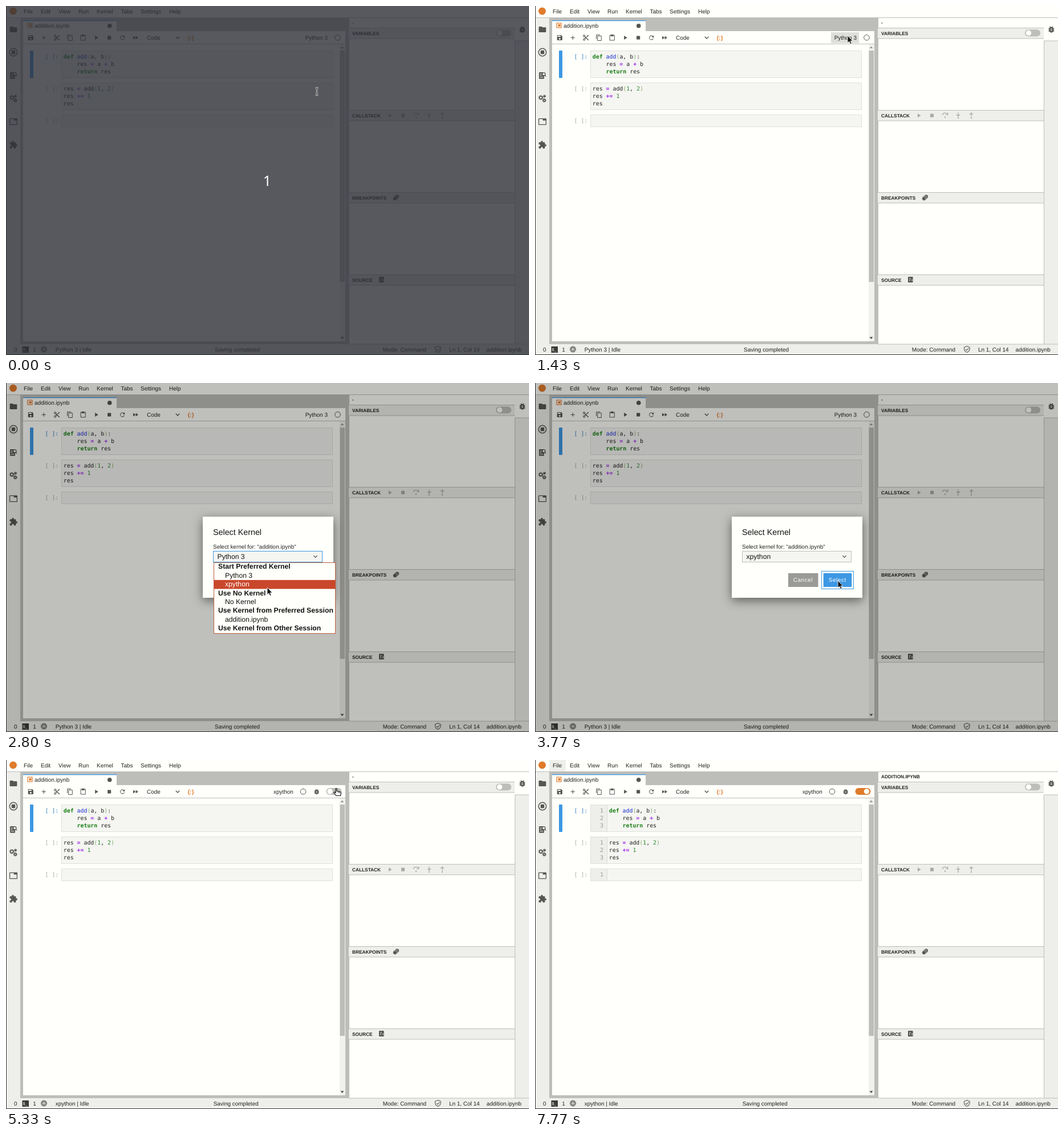
An HTML page for the animation above (8.03 s loop, 917x611 px).

```html
<!DOCTYPE html>
<html lang="en">
<head>
<meta charset="utf-8">
<title>Notebook debugger</title>
<style>
html, body { margin: 0; width: 100%; height: 100%; overflow: hidden; background: #fffffb; }
svg { display: block; width: 100%; height: 100%; }
text { font: 9.95px "Liberation Sans", Arial, sans-serif; fill: #222; white-space: pre; text-rendering: geometricPrecision; }
.mono { font: 9.9px "DejaVu Sans Mono", monospace; }
.head { font-weight: bold; font-size: 8.3px; }
.big { font-size: 12.2px; fill: #111; }
.bold { font-weight: bold; }
.btn { fill: #fffffb; letter-spacing: .6px; }
.k { fill: #1c8018; font-weight: bold; }
.f { fill: #1a2fd0; }
.o { fill: #a02be8; font-weight: bold; }
.n { fill: #2a8a2a; }
.p { fill: #7fb069; }
</style>
</head>
<body>
<svg id="stage" viewBox="0 0 917 611" xmlns="http://www.w3.org/2000/svg"></svg>
<script>
const PAGE = '#fffffb', PANEL = '#eeeeeb', GREY = '#bdbdb9', ICON = '#555552', BLUE = '#3d98e4', ORANGE = '#e07b2c';

const rect = (x, y, w, h, fill, extra = '') =>
  `<rect x="${x}" y="${y}" width="${w}" height="${h}" fill="${fill}" ${extra}/>`;
const text = (x, y, s, cls = '', extra = '') => `<text x="${x}" y="${y}" class="${cls}" ${extra}>${s}</text>`;
const disc = (x, y, r, fill, extra = '') => `<circle cx="${x}" cy="${y}" r="${r}" fill="${fill}" ${extra}/>`;
const line = (d, color, w = 1) => `<path d="${d}" fill="none" stroke="${color}" stroke-width="${w}"/>`;
const group = (id, body, extra = '') => `<g id="${id}" ${extra}>${body}</g>`;
const outline = (color, w = 1) => `stroke="${color}" stroke-width="${w}"`;

// Icons are drawn on a 24 unit grid, centred on (x, y).
const shapes = {
  folder: 'M10 4H4c-1.1 0-2 .9-2 2v12c0 1.1.9 2 2 2h16c1.1 0 2-.9 2-2V8c0-1.1-.9-2-2-2h-8z',
  puzzle: 'M20.5 11H19V7c0-1.1-.9-2-2-2h-4V3.5a2.5 2.5 0 0 0-5 0V5H4c-1.1 0-2 .9-2 2v3.8h1.5a2.7 2.7 0 0 1 0 5.4H2V20c0 1.1.9 2 2 2h3.8v-1.5a2.7 2.7 0 0 1 5.4 0V22H17c1.1 0 2-.9 2-2v-4h1.5a2.5 2.5 0 0 0 0-5z',
  tabs: 'M21 3H3c-1.1 0-2 .9-2 2v14c0 1.1.9 2 2 2h18c1.1 0 2-.9 2-2V5c0-1.1-.9-2-2-2zm0 16H3V5h10v4h8v10z',
  save: 'M17 3H5a2 2 0 0 0-2 2v14a2 2 0 0 0 2 2h14a2 2 0 0 0 2-2V7zm-5 16a3 3 0 1 1 0-6 3 3 0 0 1 0 6zm3-10H5V5h10z',
  add: 'M19 13h-6v6h-2v-6H5v-2h6V5h2v6h6z',
  cut: 'M9.6 7.6A4 4 0 1 0 6 10c.6 0 1.1-.1 1.6-.4L10 12l-2.4 2.4A4 4 0 1 0 10 18c0-.6-.1-1.1-.4-1.6L12 14l7 7h3v-1zM6 8a2 2 0 1 1 0-4 2 2 0 0 1 0 4zm0 12a2 2 0 1 1 0-4 2 2 0 0 1 0 4zM19 3l-6 6 2 2 7-7V3z',
  copy: 'M16 1H4a2 2 0 0 0-2 2v14h2V3h12zm3 4H8a2 2 0 0 0-2 2v14a2 2 0 0 0 2 2h11a2 2 0 0 0 2-2V7a2 2 0 0 0-2-2zm0 16H8V7h11z',
  paste: 'M19 2h-4.2a3 3 0 0 0-5.6 0H5a2 2 0 0 0-2 2v16a2 2 0 0 0 2 2h14a2 2 0 0 0 2-2V4a2 2 0 0 0-2-2zm0 18H5V4h2v3h10V4h2z',
  play: 'M8 5v14l11-7z',
  stop: 'M6 6h12v12H6z',
  refresh: 'M17.65 6.35A8 8 0 1 0 19.73 14h-2.08A6 6 0 1 1 12 6c1.66 0 3.14.69 4.22 1.78L13 11h7V4z',
  forward: 'M4 18l8.5-6L4 6zm9-12v12l8.5-6z',
  bug: 'M20 8h-2.8a6 6 0 0 0-1.8-2L17 4.4 15.6 3l-2.2 2.2a6 6 0 0 0-2.8 0L8.4 3 7 4.4 8.6 6a6 6 0 0 0-1.8 2H4v2h2.1L6 12H4v2h2l.1 2H4v2h2.8a6 6 0 0 0 10.4 0H20v-2h-2.1l.1-2h2v-2h-2l-.1-2H20zm-6 8h-4v-2h4zm0-4h-4v-2h4z'
};
const icon = (name, x, y, scale = .51, fill = ICON) =>
  `<path d="${shapes[name]}" fill="${fill}" fill-rule="evenodd" transform="translate(${x} ${y}) scale(${scale}) translate(-12 -12)"/>`;
const chevron = (x, y) => line(`M${x - 3.3} ${y - 1.6}l3.3 3.3 3.3-3.3`, ICON, 1.3);
const gear = (x, y, r) =>
  disc(x, y, r, 'none', outline(ICON, 1.6)) +
  disc(x, y, r + 1, 'none', outline(ICON, 1.4) + ` stroke-dasharray="${(r + 1) * Math.PI / 8}"`);
const toggle = (x, y, on) =>
  rect(x, y, 27, 12, on ? ORANGE : GREY, 'rx="6"') + disc(x + (on ? 20 : 6.5), y + 6, 4.7, PAGE);

const highlight = s => s.replace(/(\b(?:def|return)\b)|((?<=def )\w+)|(\+=|[=+])|(\d)|([()])/g,
  (m, ...g) => `<tspan class="${'kfonp'[g.slice(0, 5).findIndex(Boolean)]}">${m}</tspan>`);

const cells = [
  { y: 78, h: 47, code: ['def add(a, b):', '    res = a + b', '    return res'] },
  { y: 134, h: 47, code: ['res = add(1, 2)', 'res += 1', 'res'] },
  { y: 190, h: 21, code: [''] }
];

function menuAndSidebars() {
  const menu = [['File', 31], ['Edit', 61], ['View', 92], ['Run', 127], ['Kernel', 159], ['Tabs', 201.5], ['Settings', 236], ['Help', 286]];
  return rect(0, 0, 917, 611, PAGE) + group('fileHover', rect(25, 0, 29, 20, PANEL)) +
    disc(12.5, 9, 6.5, ORANGE) +
    menu.map(([s, x]) => text(x, 13.2, s)).join('') +
    rect(1, 20, 916, 1, GREY) + rect(1, 21, 24, 571, PANEL) + rect(25, 21, 576, 571, GREY) +
    icon('folder', 13, 41, .64) +
    disc(13, 81, 6.7, 'none', outline(ICON, 1.5)) + rect(9.8, 77.8, 6.4, 6.4, ICON, 'rx="1"') +
    rect(7, 116, 9, 11.5, ICON, 'rx="1"') + line('M8.5 119h4M8.5 121.5h3M8.5 124.5h6', PANEL) +
    disc(15.3, 119.3, 2.7, PANEL, outline(ICON, 1.3)) + line('M17 121l2 2.4', ICON, 1.4) +
    gear(10.2, 160.3, 2.5) + gear(16.3, 165.2, 1.8) + gear(16.6, 158, 1) +
    icon('tabs', 13, 202.5, .64) + icon('puzzle', 13, 243, .64);
}

function notebook() {
  const tools = ['save', 'add', 'cut', 'copy', 'paste', 'play', 'stop', 'refresh', 'forward'];
  let s = rect(30, 25, 164, 20, PAGE) + rect(30, 25, 164, 1.3, BLUE) +
    rect(38, 30, 8, 8, 'none', outline(ORANGE, 1.2)) + rect(40.5, 32, 4, 4, ORANGE) +
    text(50, 37.8, 'addition.ipynb') + disc(181.7, 34.8, 3.8, ICON) +
    rect(30, 44, 565, 543, PAGE) + rect(30, 66, 565, 1, GREY) +
    tools.map((n, i) => icon(n, 43.3 + i * 22.97, 55.5)).join('') +
    text(247, 58.6, 'Code') + chevron(301, 55.3) +
    text(324, 58.6, '{:}', 'bold', `text-anchor="middle" style="fill:${ORANGE}"`) +
    group('pyKernel', group('kernelHover', rect(519, 46, 49, 19, '#dededb')) + text(524.7, 58.7, 'Python 3') +
      disc(581.5, 55.3, 4.8, 'none', outline(ICON, 1))) +
    group('xpKernel', text(469, 58.7, 'xpython') + disc(521, 55.3, 4.8, 'none', outline(ICON, 1) + ' id="busy"') +
      group('debugBug', icon('bug', 544.7, 55.5)) +
      group('debugOff', toggle(561.5, 49, false)) + group('debugOn', toggle(561.5, 49, true))) +
    rect(585, 67, 10, 520, '#f1f1ee') + rect(585.5, 78, 8.5, 405, GREY) +
    '<path d="M586.5 74h6l-3-3.5z" fill="#999"/><path d="M586.5 579.5h6l-3 3.5z" fill="#444"/>' +
    rect(42, 78, 6, 48, BLUE, 'rx="1"');
  let code = '', gutter = '';
  cells.forEach((c, i) => {
    s += rect(97.5, c.y + .5, 475, c.h, '#f5f5f2', outline('#dfdfdc')) +
      text(68.5, c.y + 14.3, '[ ]:', 'mono', `style="fill:${i ? '#aaaaa5' : '#307fc1'}"`);
    gutter += rect(98, c.y + 1, 28, c.h - 1, PANEL) + rect(126, c.y + 1, 1, c.h - 1, '#dcdcd9');
    c.code.forEach((row, n) => {
      const y = c.y + 14.3 + n * 13;
      code += text(100.8, y, highlight(row), 'mono');
      gutter += text(120, y, n + 1, 'mono', 'text-anchor="end" style="fill:#999"');
    });
  });
  return s + group('gutter', gutter) + group('code', code);
}

function debugPanel() {
  const dim = '#aaaaa6';
  const heads = [['VARIABLES', 38], ['CALLSTACK', 182], ['BREAKPOINTS', 326], ['SOURCE', 470]];
  return rect(601, 21, 291, 571, PAGE) + rect(601, 21, 1, 571, GREY) +
    text(607, 32.3, '-', 'head', 'id="panelTitle"') +
    heads.map(([s, y]) => rect(601, y, 291, 19, PANEL) + rect(601, y, 291, 1, GREY) + rect(601, y + 18.5, 291, 1, GREY) +
      text(607, y + 12.6, s, 'head')).join('') +
    toggle(859, 41.2, false) +
    icon('play', 673, 191.7, .51, dim) + icon('stop', 696, 191.7, .51, dim) +
    line('M714.5 191a4.5 4 0 0 1 8.5-1.5M723.7 186.5v4h-4M742 186.5v6M739 190l3 3 3-3M765 194v-6M762 190l3-3 3 3', dim, 1.2) +
    disc(719, 194.7, 1.2, dim) + disc(742, 195.7, 1.2, dim) + disc(765, 196, 1.2, dim) +
    disc(685.7, 333.8, 3.4, ICON) + disc(683.8, 335.6, 3.6, ICON, outline(PANEL, .6)) + disc(682, 337.2, 3.4, ICON, outline(PANEL, .6)) +
    rect(654, 474, 8.6, 10, ICON, 'rx="1"') + line('M656 477h3M658 481.5l-2-1.5 2-1.5M660 478.5l2 1.5-2 1.5', PANEL, .9) +
    rect(892, 21, 25, 571, PANEL) + rect(892, 21, 1, 571, GREY) + rect(892, 21, 25, 40, PAGE) + rect(892, 60.5, 25, 1, GREY) +
    icon('bug', 905.3, 41, .62);
}

function statusBar() {
  const y = 604.6;
  return rect(1, 592, 916, 19, PANEL) + rect(601, 591.5, 316, 1, GREY) +
    text(14, y, '0') + rect(28.5, 596, 11.5, 11, '#3a3a38') + text(29.8, 603.8, '$_', '', 'style="font-size:7px;fill:#fff"') +
    text(47.3, y, '1') +
    disc(66.5, 601, 4.2, 'none', outline(ICON, 1.2)) + disc(66.5, 601, 5.2, 'none', outline(ICON, 1) + ' stroke-dasharray="1 1.04"') +
    rect(64.5, 599, 4, 4, 'none', outline(ICON, 1)) +
    text(86.7, y, '', '', 'id="status"') + text(366, y, 'Saving completed', '', 'id="saved"') +
    text(660.8, y, 'Mode: Command') +
    line('M757.3 595.5l4.8 2v3.2q-.5 4-4.8 5.6q-4.3-1.600-4.800-5.600v-3.200zM754.800 600.800l2 2 3.500-3.700', ICON, 1.1) +
    text(777, y, 'Ln 1, Col 14') + text(842.4, y, 'addition.ipynb');
}

function dialog() {
  const items = ['*Start Preferred Kernel', 'Python 3', 'xpython', '*Use No Kernel', 'No Kernel',
    '*Use Kernel from Preferred Session', 'addition.ipynb', '*Use Kernel from Other Session'];
  const rows = items.map((s, i) => s[0] === '*'
    ? text(372, 325.4 + i * 15.4, s.slice(1), 'big bold')
    : text(384, 325.4 + i * 15.4, s, 'big', `id="item${i}"`)).join('');
  return group('dialog', rect(0, 0, 917, 611, '#000', 'opacity=".25"') +
    rect(345, 234, 229, 142, PAGE, 'style="filter:drop-shadow(0 5px 9px rgba(0,0,0,.5))"') +
    text(363, 266, 'Select Kernel', 'big', 'style="font-size:14.3px"') +
    text(363, 289.5, 'Select kernel for: "addition.ipynb"') +
    rect(363.5, 294.5, 191, 19, '#f5f5f2', outline(GREY) + ' id="select"') +
    text(370.5, 308, 'Python 3', 'big', 'id="choice"') + chevron(542.5, 303.7) +
    rect(444, 333, 52.5, 24, '#9a9a96') + text(452.7, 348.3, 'Cancel', 'btn') +
    rect(505.7, 333, 49.6, 24, BLUE) + text(514.7, 348.3, 'Select', 'btn') +
    rect(502.5, 329.5, 56, 31, 'none', outline(BLUE) + ' id="ring"') +
    group('list', rect(364.5, 314.5, 213, 124, PAGE, outline('#b9603f')) +
      rect(364.5, 345, 213, 15.6, '#c9472b', 'id="marked"') + rows));
}

function overlays() {
  return group('tip', rect(583, 64, 156, 23, '#2d2d2b', 'rx="3"') +
      text(661, 79.5, 'Enable / Disable Debugger', 'big', 'text-anchor="middle" style="fill:#fff"')) +
    group('countdown', rect(1, 0, 916, 610, 'rgb(45,48,56)', 'opacity=".8"') +
      text(458, 315, '1', '', 'text-anchor="middle" style="font:25px \'Noto Sans\',sans-serif;fill:#fff"')) +
    rect(0, 0, 1, 611, '#333') + rect(0, 610, 917, 1, '#333') +
    group('arrow', `<path d="M0 0v12.600l2.900-2.600 2 4.500 2.200-1-2-4.200h3.800z" fill="#111" stroke="#fff" stroke-width=".8"/>`) +
    group('beam', line('M-2.500-5.500q2.500 0 2.500 1.500q0-1.500 2.500-1.500M0-4.500v10M-2.500 6.500q2.500 0 2.500-1.500q0 1.500 2.500 1.500', '#fff', 2.4) +
      line('M-2.500-5.500q2.500 0 2.500 1.500q0-1.500 2.500-1.500M0-4.500v10M-2.500 6.500q2.500 0 2.500-1.500q0 1.500 2.500 1.500', '#111', 1)) +
    group('hand', `<path d="M0 0q1.300-1 2 .5v4l5.500 1q2 .5 2 2.500l-1 4.500H1L-3 7.500q-.5-1.500 1-1.500l2 1.500z" fill="#fff" stroke="#111" stroke-width="1.200"/>` +
      line('M4.300 5.200v2.500M6.700 5.700v2.300', '#111', .8));
}

const stage = document.getElementById('stage');
stage.innerHTML = menuAndSidebars() + notebook() + debugPanel() + statusBar() + dialog() + overlays();
const el = {};
stage.querySelectorAll('[id]').forEach(e => el[e.id] = e);

const show = (id, on) => el[id].setAttribute('display', on ? 'inline' : 'none');
const put = (id, s) => { if (el[id].textContent !== s) el[id].textContent = s; };
const within = (v, a, b) => v >= a && v < b;

// Pointer stops: time, x, y
const path = [
  [800, 545, 149], [1330, 548, 52], [1730, 548, 52], [2330, 375, 306], [2470, 375, 306],
  [2600, 415, 314], [2790, 415, 314], [2799, 458, 358], [3020, 458, 358], [3029, 568, 352],
  [3230, 568, 352], [3700, 531, 346], [4400, 531, 346], [4830, 551, 164], [4930, 551, 164],
  [5330, 578, 50], [6830, 578, 50], [7270, 535, 53], [7370, 535, 53], [7735, 42, -20]
];
function pointerAt(t) {
  const i = path.findIndex(p => p[0] > t);
  if (i < 0) return path[path.length - 1].slice(1);
  if (i === 0) return path[0].slice(1);
  const [t0, x0, y0] = path[i - 1], [t1, x1, y1] = path[i];
  const u = (t - t0) / (t1 - t0), k = u * u * (3 - 2 * u);
  return [x0 + (x1 - x0) * k, y0 + (y1 - y0) * k];
}

function drawPointer(t, modal) {
  const tick = 100 / 3;
  const [x, y] = pointerAt(Math.floor((t + 4) / tick) * tick);
  const overCode = !modal && within(x, 97, 572) && cells.some(c => within(y, c.y, c.y + c.h));
  const overToggle = t > 4900 && within(x, 561, 590) && within(y, 47, 62);
  const kind = overCode ? 'beam' : overToggle ? 'hand' : 'arrow';
  for (const id of ['beam', 'hand', 'arrow']) show(id, id === kind);
  el[kind].setAttribute('transform', `translate(${x} ${y})`);
  return [x, y];
}

function draw(t) {
  const modal = within(t, 1500, 3830), open = within(t, 2470, 3230), xp = t >= 4130, lined = t >= 6900;
  const busy = within(t, 4130, 4600) || within(t, 6300, 6430) || within(t, 6900, 7000);
  const [x, y] = drawPointer(t, modal);

  show('countdown', t < 30);
  show('dialog', modal);
  show('list', open);
  show('ring', t < 2470 || t >= 3700);
  el.select.setAttribute('stroke', within(t, 2470, 3700) ? BLUE : GREY);
  put('choice', t < 3230 ? 'Python 3' : 'xpython');
  const row = t < 2800 ? 1 : 2;
  el.marked.setAttribute('y', 313.9 + row * 15.5);
  el.item1.style.fill = row === 1 ? '#fff' : '';
  el.item2.style.fill = row === 2 ? '#fff' : '';

  show('pyKernel', !xp);
  show('xpKernel', xp);
  show('kernelHover', t < 1570 && within(x, 519, 568) && within(y, 46, 65));
  show('debugBug', t >= 4330);
  show('debugOff', within(t, 4330, 6300));
  show('debugOn', t >= 6300);
  el.busy.setAttribute('fill', busy ? ICON : 'none');
  put('status', (xp ? 'xpython' : 'Python 3') + ' | ' + (busy ? (t < 4600 ? 'Starting' : 'Busy') : 'Idle'));
  el.saved.setAttribute('x', xp ? 363.7 : 366);

  show('tip', within(t, 5770, 6300));
  show('gutter', lined);
  el.code.setAttribute('transform', `translate(${lined ? 29 : 0} 0)`);
  put('panelTitle', lined ? 'ADDITION.IPYNB' : '-');
  show('fileHover', t >= 7690);
}

const LOOP = 8030, start = performance.now();
function frame() {
  draw((performance.now() - start) % LOOP);
  requestAnimationFrame(frame);
}
frame();
</script>
</body>
</html>
```
